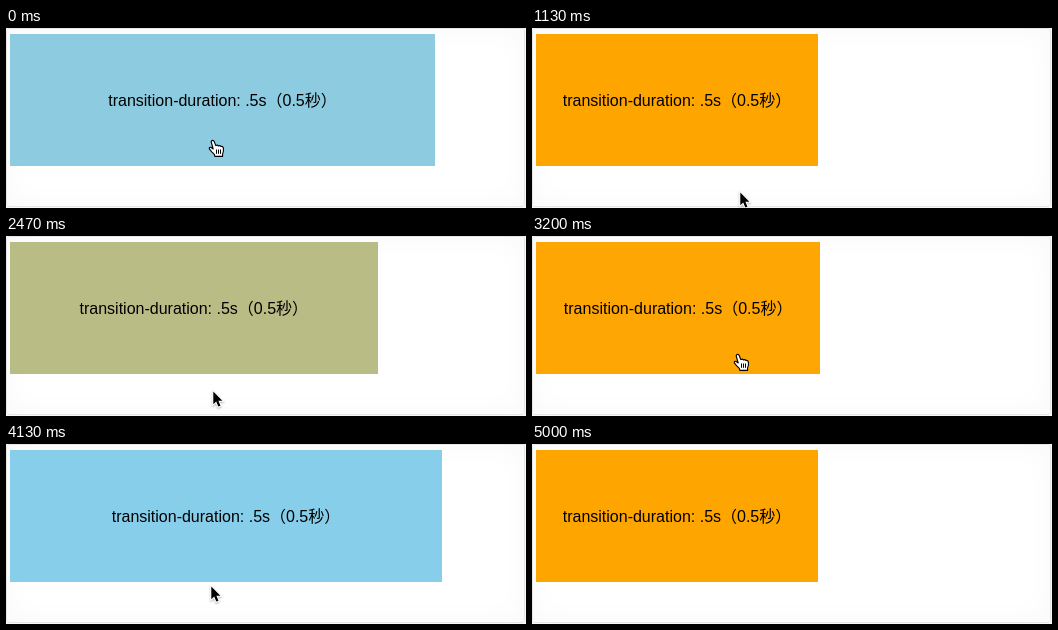
Recreate the animation shown at these times as an HTML page with a canvas. Size 520 by 180 pixels, loop 6070 ms.

```html
<!DOCTYPE html>
<html lang="ja">
<head>
<meta charset="utf-8">
<title>transition-duration</title>
<style>
  html, body { margin: 0; width: 100%; height: 100%; overflow: hidden; background: #fff; }
  #stage { position: relative; width: 520px; height: 180px; overflow: hidden; background: #fff; }
  #frame {
    position: absolute; left: 0; top: 0; width: 517px; height: 177px;
    border: 1px solid #e6e6e6; border-radius: 3px;
    box-shadow: inset 0 0 28px rgba(0, 0, 0, .03), 0 0 0 2px #f8f8f8;
  }
  #box {
    position: absolute; left: 4px; top: 6px; height: 132px;
    font: 16px/134px "Liberation Sans", Arial, "Noto Sans CJK JP", "Noto Sans CJK", sans-serif;
    color: #000; text-align: center; white-space: nowrap;
  }
  canvas { position: absolute; left: 0; top: 0; }
</style>
</head>
<body>
<div id="stage">
  <div id="frame"></div>
  <div id="box">transition-duration: .5s（0.5秒）</div>
  <canvas id="pointer" width="520" height="180"></canvas>
</div>
<script>
const LOOP = 6070, STEP = 1000 / 15, DURATION = 500;
const SMALL = { width: 282, color: [255, 165, 0] };
const LARGE = { width: 432, color: [135, 206, 235] };
const BOX_BOTTOM = 138, POINTER_GONE = 4995;

// Starts of the transitions: grow and shrink in turn
const toggles = [-365, 533, 1488, 2337, 3186, 4136];

// Each move eases the pointer from where it rests to a new spot
const home = { x: 207, y: 112 };
const moves = [
  { at: 335, time: 400, x: 208, y: 164 },
  { at: 1335, time: 200, x: 206, y: 130 },
  { at: 2270, time: 200, x: 207, y: 155 },
  { at: 2935, time: 330, x: 206, y: 114 },
  { at: 3600, time: 700, x: 205, y: 147 },
  { at: 4300, time: 630, x: 205, y: 156 }
];

const arrow = new Path2D("M.3 .5V13.2L3.2 10.6L5.3 15.6L7.5 14.7L5.4 9.8H9.4Z");
const hand = new Path2D(
  "M-1.8 2Q-1.8 .4 -.4 .4Q.8 .4 1.4 2L2.8 5.6Q4.4 4.6 5.4 5.9Q7 5 8 6.5" +
  "Q10 6 10.4 8.4Q10.9 11.4 9.6 14V16.4H1.8L1.3 14.4L-1.2 11.8L-3.7 8.8" +
  "Q-3.9 7 -2.1 7.3L.2 9Z"
);
const creases = new Path2D("M3.5 9.5V13.8M5.5 9.5V13.8M7.5 9.5V13.8");

const box = document.getElementById("box");
const ctx = document.getElementById("pointer").getContext("2d");
const mix = (a, b, k) => a + (b - a) * k;
const clamp = k => Math.min(1, Math.max(0, k));
const smooth = k => k * k * (3 - 2 * k);

// CSS "ease": cubic-bezier(.25, .1, .25, 1)
function ease(x) {
  if (x >= 1) return 1;
  let lo = 0, hi = 1, s = .5;
  for (let i = 0; i < 30; i++) {
    s = (lo + hi) / 2;
    if (.75 * s * (1 - s) + s ** 3 < x) lo = s; else hi = s;
  }
  return .3 * s * (1 - s) ** 2 + 3 * s * s * (1 - s) + s ** 3;
}

function growth(t) {
  const i = toggles.filter(start => start <= t).length - 1;
  const k = ease((t - toggles[i]) / DURATION);
  return i % 2 ? 1 - k : k;
}

function pointerAt(t) {
  let { x, y } = home;
  for (const m of moves) {
    const k = smooth(clamp((t - m.at) / m.time));
    x = mix(x, m.x, k);
    y = mix(y, m.y, k);
  }
  return [Math.round(x), Math.round(y)];
}

function drawArrow() {
  ctx.lineJoin = "miter";
  ctx.shadowColor = "rgba(0,0,0,.3)";
  ctx.shadowBlur = 2;
  ctx.shadowOffsetY = 1;
  ctx.strokeStyle = "#fff";
  ctx.lineWidth = 2;
  ctx.stroke(arrow);
  ctx.shadowColor = "transparent";
  ctx.fillStyle = "#000";
  ctx.fill(arrow);
}

function drawHand() {
  ctx.lineJoin = "round";
  ctx.fillStyle = "#fff";
  ctx.fill(hand);
  ctx.strokeStyle = "#000";
  ctx.lineWidth = 1.1;
  ctx.stroke(hand);
  ctx.lineWidth = 1;
  ctx.stroke(creases);
}

function render(now) {
  const t = Math.floor((now % LOOP + 5) / STEP) * STEP;
  const k = growth(t);
  box.style.width = mix(SMALL.width, LARGE.width, k) + "px";
  const rgb = SMALL.color.map((c, i) => Math.round(mix(c, LARGE.color[i], k)));
  box.style.backgroundColor = `rgb(${rgb})`;

  ctx.clearRect(0, 0, 520, 180);
  if (t < POINTER_GONE) {
    const [x, y] = pointerAt(t);
    ctx.save();
    ctx.translate(x, y);
    if (y < BOX_BOTTOM) drawHand(); else drawArrow();
    ctx.restore();
  }
}

let origin = null;
function tick(now) {
  if (origin === null) origin = now;
  render(now - origin);
  requestAnimationFrame(tick);
}
render(0);
requestAnimationFrame(tick);
</script>
</body>
</html>
```
